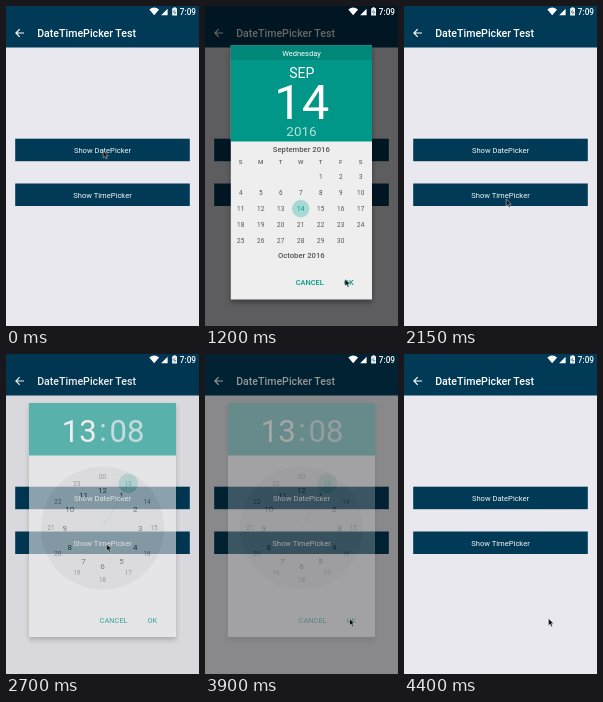
These frames come from a looping animation (193x320 px, 4450 ms). An HTML page:

```html
<!DOCTYPE html>
<html lang="en">
<head>
<meta charset="utf-8">
<title>Date and time pickers</title>
<style>
  html, body { margin: 0; height: 100%; overflow: hidden; background: #e9e8ee; }
  svg { display: block; width: 100vw; height: 100vh; font-family: Roboto, sans-serif; }
  .shadow { filter: blur(2.5px); }
</style>
</head>
<body>
<svg id="stage" viewBox="0 0 193 320"></svg>
<script>
const LOOP = 4450, TEAL = '#009688', NAVY = '#003a57';
const stage = document.getElementById('stage');

const rect = (x, y, w, h, fill, extra = '') =>
  `<rect x="${x}" y="${y}" width="${w}" height="${h}" fill="${fill}" ${extra}/>`;
const circle = (x, y, r, fill, extra = '') =>
  `<circle cx="${x}" cy="${y}" r="${r}" fill="${fill}" ${extra}/>`;
const label = (s, x, y, size, fill, weight = 400, anchor = 'middle') =>
  `<text x="${x}" y="${y}" font-size="${size}" fill="${fill}" font-weight="${weight}" text-anchor="${anchor}">${s}</text>`;

function page() {
  const button = (y, s) => rect(9.2, y, 174.6, 22.5, NAVY) + label(s, 96.5, y + 14, 7.6, '#f4f6f8');
  return rect(0, 0, 193, 320, '#e9e8ee') + rect(0, 0, 193, 41.5, NAVY) +
    '<path d="M18 27H10M13.7 23.2L9.9 27L13.7 30.8" fill="none" stroke="#fff" stroke-width="1.2"/>' +
    label('DateTimePicker Test', 31.2, 30.6, 10.6, '#fff', 500, 'start') +
    button(132.7, 'Show DatePicker') + button(177.5, 'Show TimePicker');
}

function statusBar() {
  return '<g fill="#fff"><path d="M143.3 3.4Q148.2 -.2 153.1 3.4L148.2 9.3Z"/>' +
    '<path d="M161.6 2.8V9.3H155.1Z"/>' +
    '<path d="M166.2 2.2H167.6V1.2H169.6V2.2H171V9.4H166.2Z"/></g>' +
    '<path d="M169 3.5L167.3 6.2H170L168.3 8.5" fill="none" stroke="#003a57" stroke-width=".6"/>' +
    label('7:09', 190, 9, 8.2, '#fff', 500, 'end');
}

function actions(cancelX, okX, y) {
  return label('CANCEL', cancelX, y, 7.4, TEAL, 500) + label('OK', okX, y, 7.4, TEAL, 500);
}

function panel(x, y, w, h) {
  return rect(x, y + 3, w, h, '#000', 'class="shadow" opacity=".35"') + rect(x, y, w, h, '#eee');
}

function dateDialog() {
  const col = i => 35.7 + i * 20;
  let days = label('September 2016', 96.3, 145.6, 7.7, '#555', 500) +
    label('October 2016', 96.3, 252, 7.7, '#555', 500);
  [...'SMTWTFS'].forEach((d, i) => days += label(d, col(i), 158.2, 6.2, '#666', 500));
  for (let d = 1; d <= 30; d++) {
    const cell = d + 3;
    days += label(d, col(cell % 7), 172.5 + Math.floor(cell / 7) * 16.2, 6.4, d === 14 ? TEAL : '#555');
  }
  return panel(25.8, 39.5, 141.2, 254) +
    rect(25.8, 39.5, 141.2, 96, TEAL) + rect(25.8, 39.5, 141.2, 14.5, '#00877a') +
    label('Wednesday', 96.5, 49.6, 7.5, '#fff') +
    label('SEP', 96.7, 71.5, 14, '#fff') +
    label('14', 96.7, 113.3, 49, '#fff') +
    label('2016', 96.5, 130, 13.5, '#b8e0dc') +
    circle(95.7, 202.6, 8.8, '#a7dad5') +
    `<g id="days">${days}</g>` + actions(104.8, 143.7, 278.6);
}

function timeDialog() {
  const cx = 96.5, cy = 174;
  const at = (hour, r) => {
    const a = hour * Math.PI / 6;
    return [cx + r * Math.sin(a), cy - r * Math.cos(a)];
  };
  const [sx, sy] = at(1, 51.5);
  let face = circle(cx, cy, 61.6, '#dedede') +
    `<path d="M${cx} ${cy}L${sx} ${sy}" stroke="${TEAL}" stroke-width=".7" opacity=".2"/>` +
    circle(sx, sy, 9.8, TEAL, 'opacity=".3"');
  for (let h = 1; h <= 12; h++) {
    const [ix, iy] = at(h, 37.8), [ox, oy] = at(h, 51.5);
    face += label(h, ix, iy + 2.8, 8, '#333') +
      label(h === 12 ? '00' : h + 12, ox, oy + 2.2, 6.3, h === 1 ? TEAL : '#666');
  }
  return panel(23, 49, 147, 234) + rect(23, 49, 147, 52.5, TEAL) +
    label('13', 73.3, 88, 31, '#fff') + label(':', 97, 87, 31, '#b8e0dc') +
    label('08', 121, 88, 31, '#b8e0dc') + face + actions(107.6, 146.3, 269);
}

stage.innerHTML = page() + rect(0, 0, 193, 320, '#000', 'id="shade"') +
  `<g id="date">${dateDialog()}</g><g id="time">${timeDialog()}</g>` + statusBar() +
  '<path id="cursor" d="M0 0V7L1.6 5.6L2.8 8.2L4 7.6L2.9 5.1H5Z" fill="#111" stroke="#ddd" stroke-width=".5"/>';

const [shade, date, time, days, cursor] =
  ['shade', 'date', 'time', 'days', 'cursor'].map(id => document.getElementById(id));

const clamp = v => Math.max(0, Math.min(1, v));
const ramp = (t, start, length) => clamp((t - start) / length);

// Each stop: time, x, y
const path = [
  [0, 97.2, 144.7], [600, 97.2, 144.7], [1100, 140, 273], [1560, 140, 273], [1700, 148, 279],
  [1760, 148, 279], [2200, 100.6, 190], [3250, 100.6, 190], [3800, 144.5, 264.5], [LOOP, 144.5, 264.5]
];

function cursorAt(t) {
  const i = path.findIndex(stop => stop[0] > t);
  const [t0, x0, y0] = path[i - 1], [t1, x1, y1] = path[i];
  const u = (t - t0) / (t1 - t0), k = u * u * (3 - 2 * u);
  return [x0 + (x1 - x0) * k, y0 + (y1 - y0) * k];
}

// The dialog fades faster than the shade behind it
const dialogAlpha = (t, open, close) => ramp(t, open, 36) * (1 - ramp(t, close, 87));
const shadeAlpha = (t, open, close) => .6 * ramp(t, open, 180) * (1 - ramp(t, close, 210));

function draw(now) {
  const t = now % LOOP;
  const dateSpan = [20, 1560], timeSpan = [2680, 3836];
  date.setAttribute('opacity', dialogAlpha(t, ...dateSpan));
  time.setAttribute('opacity', dialogAlpha(t, ...timeSpan));
  shade.setAttribute('opacity', Math.max(shadeAlpha(t, ...dateSpan), shadeAlpha(t, ...timeSpan)));
  days.setAttribute('opacity', .5 + .5 * ramp(t, 50, 350));
  cursor.setAttribute('transform', `translate(${cursorAt(t)})`);
}

const start = performance.now();
function tick() {
  draw(performance.now() - start);
  requestAnimationFrame(tick);
}
tick();
</script>
</body>
</html>
```
